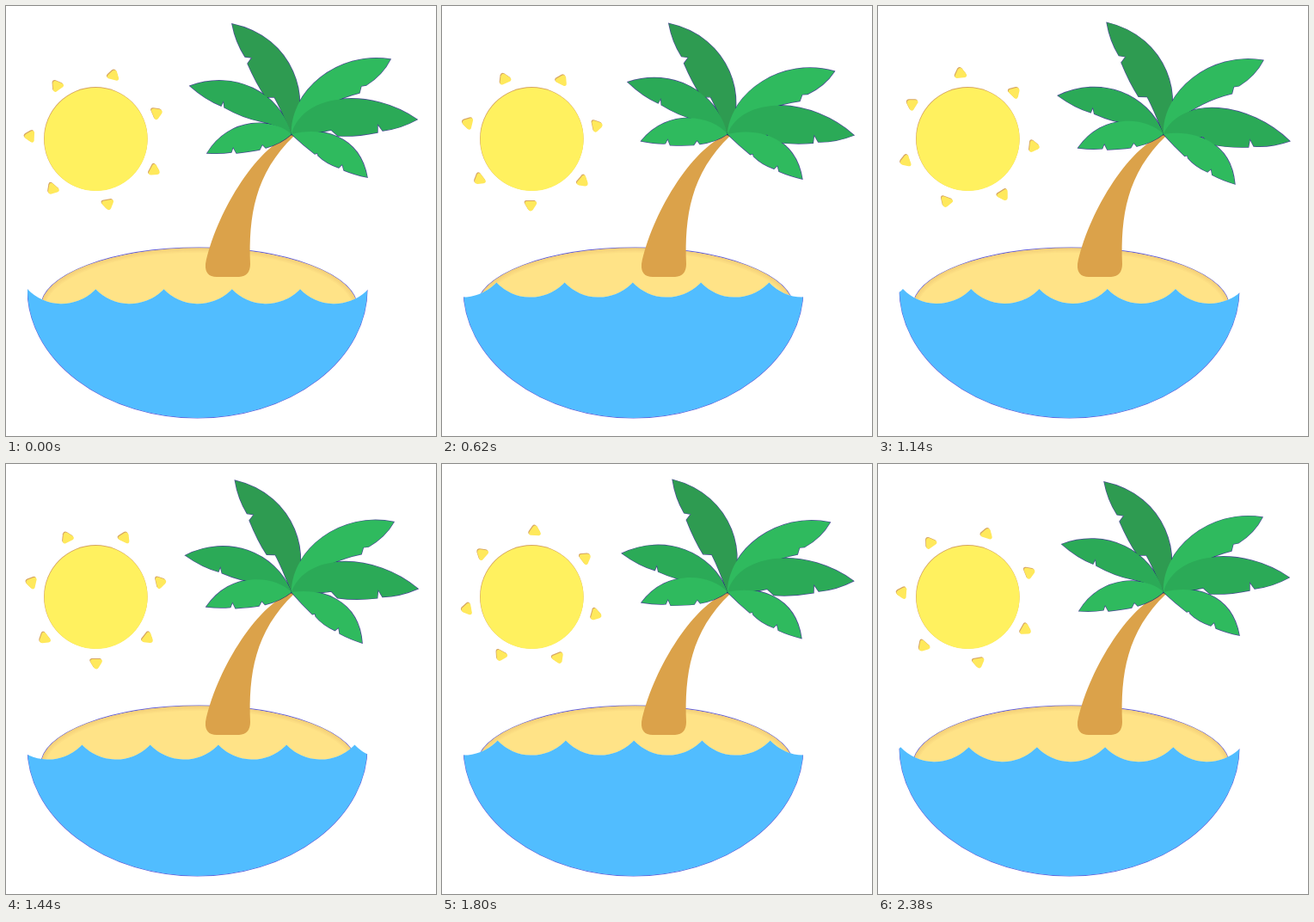
Write an HTML page with a canvas that moves like this. It is 500 px wide and 500 px high and loops after 2.4 s.

```html
<!DOCTYPE html>
<html lang="en">
<head>
<meta charset="utf-8">
<title>Island</title>
<style>
  html, body { margin: 0; width: 100%; height: 100%; overflow: hidden; background: #fff; }
  canvas { display: block; width: 500px; height: 500px; }
</style>
</head>
<body>
<canvas id="stage" width="500" height="500"></canvas>
<script>
const ctx = document.getElementById('stage').getContext('2d');
const LOOP = 2400;
const TAU = Math.PI * 2;
const RAD = Math.PI / 180;
const PIVOT = [332, 148];
const FRINGE = 'rgba(30, 25, 200, 0.7)';
const TAN = '#d6a562';

// Sway angles in degrees at the shared key times, clockwise positive.
const keyTimes = [0, 300, 620, 1140, 1440, 1800, 2400];
const leaves = [
  { color: '#2e9b51', sway: [0, 0.3, 0.4, 1.4, 1.5, 2.3],
    shape: 'C356 110 335 36 263 21 Q267 42 278 59 L286 60 L281 67 Q291 90 302 106 L312 106 Q320 120 332 149Z' },
  { color: '#2baa57', sway: [0, 1, 2.2, -5.3, -6.3, -5.2],
    shape: 'C318 100 265 74 214 93 Q232 109 250 116 L253 110 L254 118 Q275 130 296 134 Q315 138 332 149Z' },
  { color: '#2fba5e', sway: [0, 4.7, 6.7, 0.6, 2.7, 2.9],
    shape: 'C330 100 385 52 447 62 Q438 80 419 92 L413 93 L411 101 Q375 110 345 135 L332 149Z' },
  { color: '#2baa57', sway: [0, 1.6, 7.1, 9.8, 5.1, 1.6],
    shape: 'C345 100 425 95 478 132 Q458 143 438 145 L432 137 L432 147 Q408 152 386 151 L378 144 Q360 149 332 149Z' },
  { color: '#2fba5e', sway: [0, 2, 1.3, 5.3, 6.1, 2.3],
    shape: 'C365 140 411 149 420 199 Q405 196 393 191 L391 184 L387 188 Q372 183 363 174 L362 171 L359 172 Q346 162 332 149Z' },
  { color: '#2fba5e', sway: [0, 4, 8.1, 3.5, 2.9, 5.8],
    shape: 'C312 130 260 128 234 171 Q250 172 262 170 L264 164 L268 171 Q285 169 295 167 L298 161 L302 165 Q320 160 332 149Z' }
].map(leaf => ({ ...leaf, path: new Path2D('M332 149 ' + leaf.shape) }));

const trunk = new Path2D('M333 149 C289 165 243 245 232 300 Q231 315 245 315 H271 Q284 314 284 300 C282 245 289 195 335 151Z');
const ray = new Path2D('M-5 -72 H5 Q8 -73 6.3 -76 L2.6 -82 Q0 -85 -2.6 -82 L-6.3 -76 Q-8 -73 -5 -72Z');
const sand = ellipse(224.5, 350.5, 184, 69.3);
const bowl = ellipse(222.5, 329, 197.5, 150);

function ellipse(x, y, rx, ry) {
  const path = new Path2D();
  path.ellipse(x, y, rx, ry, 0, 0, TAU);
  return path;
}

function fill(path, color) {
  ctx.fillStyle = color;
  ctx.fill(path);
}

function stroke(path, color, width) {
  ctx.strokeStyle = color;
  ctx.lineWidth = width;
  ctx.stroke(path);
}

// Smooth periodic curve through the key values.
function swayAt(values, t) {
  const n = values.length;
  const time = i => keyTimes[(i + n) % n] + LOOP * Math.floor(i / n);
  const value = i => values[(i + n) % n];
  const slope = i => (value(i + 1) - value(i - 1)) / (time(i + 1) - time(i - 1));
  let i = 0;
  while (i < n - 1 && t >= keyTimes[i + 1]) i++;
  const span = time(i + 1) - time(i);
  const u = (t - time(i)) / span;
  const v = 1 - u;
  return value(i) * v * v * (1 + 2 * u) + value(i + 1) * u * u * (3 - 2 * u)
    + span * u * v * (slope(i) * v - slope(i + 1) * u);
}

function turned(x, y, angle, draw) {
  ctx.save();
  ctx.translate(x, y);
  ctx.rotate(angle);
  draw();
  ctx.restore();
}

function drawSun(t) {
  fill(ellipse(104.3, 154.4, 60.3, 60.3), TAN);
  fill(ellipse(104.6, 155, 60, 60), '#fff15f');
  const start = 15.3 * RAD - t / LOOP * 3 * TAU / 7;
  for (let i = 0; i < 7; i++) {
    const angle = start + i * TAU / 7;
    turned(104, 154, angle, () => fill(ray, TAN));
    turned(104.8, 155, angle, () => fill(ray, '#ffe95c'));
  }
}

function drawSand() {
  stroke(sand, FRINGE, 1.2);
  fill(sand, '#ffe387');
  ctx.save();
  ctx.clip(sand);
  for (let width = 2; width <= 11; width += 3) stroke(sand, 'rgba(200, 140, 70, 0.06)', width);
  ctx.restore();
}

function drawSea(t) {
  const length = 79.25, depth = 17;
  const radius = (length * length / 4 + depth * depth) / (2 * depth);
  const half = Math.asin(length / 2 / radius);
  const phase = t / 1200;
  const crest = 325.4 + 3.8 * Math.cos(phase * TAU);
  const left = 25 - (phase % 1) * length;

  const surface = new Path2D();
  surface.moveTo(left, 500);
  for (let i = 0; i < 7; i++) {
    surface.arc(left + (i + 0.5) * length, crest + depth - radius, radius,
      Math.PI / 2 + half, Math.PI / 2 - half, true);
  }
  surface.lineTo(left + 7 * length, 500);
  surface.closePath();

  // White hides any sand below the water line outside the bowl.
  ctx.save();
  ctx.clip(surface);
  fill(surface, '#fff');
  stroke(bowl, FRINGE, 1.2);
  fill(bowl, '#51bdff');
  ctx.restore();
}

function drawPalm(t) {
  fill(trunk, '#dba24a');
  const eachLeaf = paint => leaves.forEach(leaf =>
    turned(...PIVOT, swayAt(leaf.sway, t) * RAD, () => {
      ctx.translate(-PIVOT[0], -PIVOT[1]);
      paint(leaf);
    }));
  eachLeaf(leaf => stroke(leaf.path, 'rgba(12, 15, 110, 0.75)', 1.4));
  eachLeaf(leaf => fill(leaf.path, leaf.color));
}

function render(now) {
  const t = now % LOOP;
  ctx.fillStyle = '#fff';
  ctx.fillRect(0, 0, 500, 500);
  drawSun(t);
  drawSand();
  drawSea(t);
  drawPalm(t);
}

let start;
function tick(now) {
  start ??= now;
  render(Math.max(0, now - start));
  requestAnimationFrame(tick);
}
render(0);
requestAnimationFrame(tick);
</script>
</body>
</html>
```
